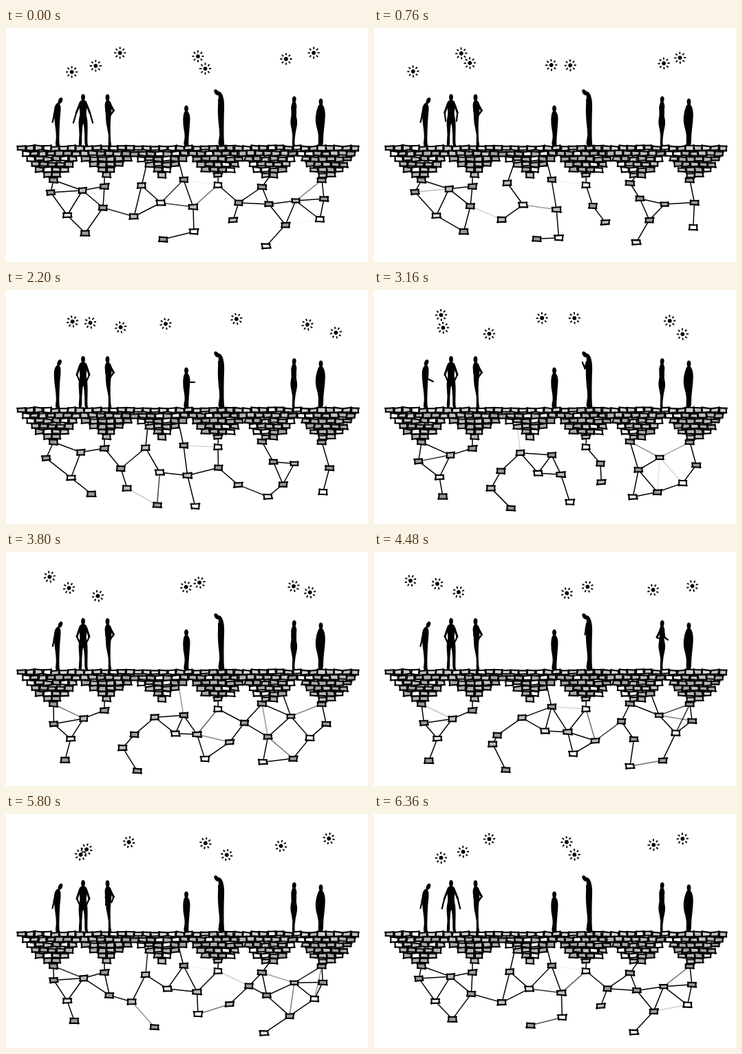
Animation, 526 px wide and 340 px high, one loop 6.4 s. Source, as an HTML page with a canvas:

```html
<!DOCTYPE html>
<html lang="en">
<head>
<meta charset="utf-8">
<title>People and roots</title>
<style>
html, body { margin: 0; width: 100%; height: 100%; overflow: hidden; background: #fff; }
canvas { display: block; }
</style>
</head>
<body>
<canvas id="stage" width="526" height="340"></canvas>
<script>
const ctx = document.getElementById('stage').getContext('2d');
const LOOP = 6400, TAU = Math.PI * 2;
const REACH = 50.8, CEILING = 220.5;
const GREY = '#999', MID = '#bcbcbc', LIGHT = '#e8e8e8', WHITE = '#fff';

let seed = 11;
const rand = () => (seed = seed * 16807 % 2147483647) / 2147483647;
const jitter = a => (rand() * 2 - 1) * a;

function line(...p) {
  ctx.beginPath();
  for (let i = 0; i < p.length; i += 2) ctx.lineTo(p[i], p[i + 1]);
  ctx.stroke();
}

// --- bricks ---
function makeBrick(w, h, fill, rough) {
  const corners = [[-1, -1], [1, -1], [1, 1], [-1, 1]]
    .map(([x, y]) => [x * w / 2 + jitter(rough), y * h / 2 + jitter(rough)]);
  return { corners, fill };
}

function drawBrick({ corners, fill }, x, y) {
  ctx.fillStyle = fill;
  ctx.lineWidth = 2.1;
  ctx.beginPath();
  corners.forEach(([a, b]) => ctx.lineTo(x + a, y + b));
  ctx.fill();
  corners.forEach(([a, b], i) => {
    const [c, d] = corners[(i + 1) % 4], over = .06;
    line(x + a - (c - a) * over, y + b - (d - b) * over,
      x + c + (c - a) * over, y + d + (d - b) * over);
  });
}

const wall = [];
function course(row, centre, count) {
  const w = 12.1;
  for (let i = 0; i < count; i++) {
    const grey = row ? 62 + rand() * 16 : 72 + rand() * 14;
    const fill = rand() < .12 ? WHITE : `hsl(0 0% ${grey}%)`;
    wall.push({
      x: centre + (i - (count - 1) / 2) * w,
      y: 174.6 + row * 7.8 + jitter(.6),
      brick: makeBrick(w - 1.2, 6.2, fill, .9)
    });
  }
}
const mound = (centre, ...counts) => counts.forEach((n, i) => course(i + 2, centre, n));
course(0, 265, 41);
course(1, 265, 40);
mound(67, 6, 5, 4, 2);
mound(146, 6, 4, 2, 1);
mound(227, 6, 4, 2, 1);
mound(308, 6, 5, 4, 1);
mound(383, 6, 5, 4, 2);
mound(466, 6, 5, 4, 2);

// --- roots: every brick circles its home on a flat ellipse, below the wall ---
const nodes = [];
function node(fill, x, y, xCos = 0, xSin = 0, yCos = 0, ySin = 0) {
  const at = a => {
    const c = Math.cos(a), s = Math.sin(a);
    return [x + xCos * c + xSin * s, Math.max(CEILING, y + yCos * c + ySin * s)];
  };
  nodes.push({ at, brick: makeBrick(11, 6.4, fill, .7) });
}
const anchor = (x, y) => nodes.push({ at: () => [x, y] });

anchor(143, 192);
anchor(207, 187);
anchor(250, 189);
anchor(309, 190);
anchor(398, 195);
node(GREY, 69, 221);
node(GREY, 143, 230);
node(WHITE, 308, 228);
node(GREY, 459, 221);
node(GREY, 65, 244, 0, -8, -5, -3);
node(MID, 111, 238, 0, -3, -2, -4);
node(LIGHT, 92, 272, -3, 1, 0, 1);
node(GREY, 107, 299, 8, 26, -1, -4);
node(GREY, 163, 262, -22, -10, -1, -4);
node(MID, 178, 281, 8, 3, -7, 4);
node(MID, 205, 233, -8, -8, -4, -7);
node(LIGHT, 232, 260, -7, -15, -6, 2);
node(GREY, 258, 214, 0, 0, -26, -3);
node(MID, 272, 264, 0, -10, -4, 4);
node(WHITE, 279, 302, -6, -9, -6, 11);
node(GREY, 213, 312, 15, 18, -5, -3);
node(GREY, 334, 253, 4, -28, 1, 7);
node(MID, 330, 279, 0, 9, 0, 5);
node(GREY, 372, 218, 0, 0, 13, -3);
node(GREY, 383, 259, -1, 6, -3, -13);
node(MID, 418, 247, 3, 3, 4, 9);
node(GREY, 465, 251, -3, 4, -3, 7);
node(WHITE, 452, 279, 4, 13, -1, 17);
node(GREY, 409, 290, -3, -10, -4, -12);
node(LIGHT, 377, 309, 1, 5, 8, -5);

function drawRoots(angle) {
  const spots = nodes.map(n => n.at(angle));
  ctx.lineWidth = 1.5;
  spots.forEach(([x, y], i) => spots.slice(0, i).forEach(([u, v]) => {
    const alpha = (REACH - Math.hypot(x - u, y - v)) / 4.5;
    if (alpha <= 0) return;
    ctx.globalAlpha = Math.min(1, alpha);
    line(x, y, u, v);
  }));
  ctx.globalAlpha = 1;
  wall.forEach(b => drawBrick(b.brick, b.x, b.y));
  nodes.forEach((n, i) => n.brick && drawBrick(n.brick, ...spots[i]));
}

// --- suns: each drifts along a Lissajous curve ---
const suns = [];
const sun = (cx, ax, fx, px, ay, fy, py) => suns.push({ cx, ax, fx, px, ay, fy, py });
sun(80, 29, 2, 1, 14.5, 1, -.3);
sun(115, 24.6, 1, -.9, 5, 2, -.1);
sun(150, 29, 2, 1, -14.5, 1, -.3);
sun(262, 30, 1, .97, 10, 2, -2.67);
sun(308, 28.3, 2, 2.28, 9.7, 1, .37);
sun(418, 20, 1, -2.16, 5.3, 2, -2.8);
sun(460.5, 20, 2, 2.3, 14.8, 1, -2.79);

function drawSun(s, angle) {
  ctx.save();
  ctx.translate(s.cx + s.ax * Math.cos(s.fx * angle + s.px), 50 + s.ay * Math.cos(s.fy * angle + s.py));
  ctx.rotate(angle);
  ctx.beginPath();
  ctx.arc(0, 0, 2.9, 0, TAU);
  ctx.fill();
  ctx.lineWidth = 1.9;
  ctx.lineCap = 'butt';
  for (let i = 0; i < 8; i++) {
    line(5.4, 0, 8.6, 0);
    ctx.rotate(TAU / 8);
  }
  ctx.restore();
}

// --- people: a resting pose, blended into a gesture around a given time ---
function bump(t, at, half) {
  const d = Math.abs((t - at + LOOP * 1.5) % LOOP - LOOP / 2);
  return d < half ? (1 + Math.cos(Math.PI * d / half)) / 2 : 0;
}
const gesture = (at, to, half = 800) => ({ at, to, half });
const pose = (rest, ...moves) => t => rest.map((v, i) =>
  moves.reduce((sum, m) => sum + (m.to[i] - v) * bump(t, m.at, m.half), v));

const people = [];
const person = (head, tilt, body, ...arms) => people.push({ head, tilt, body, arms });
// Arm poses list the elbow, then the hand.
const arm = (x, y, ...poses) => ({ x, y, bend: pose(...poses) });
const mirror = (axis, p) => p.map((v, i) => i % 2 ? v : 2 * axis - v);

person(pose([79, 105.5], gesture(2800, [75, 105.5], 1000)), .4,
  [74, 108, 78, 109, 80, 116, 78, 135, 77, 168, 79, 172, 71, 172, 73.5, 158, 70, 132, 69.5, 116],
  arm(73, 115, [70, 126, 67.5, 137],
    gesture(2200, [72, 126, 72, 138], 700), gesture(3160, [76, 128, 86, 133], 700)));

const hips = [103, 123, 108, 134], lowered = [102, 123, 95, 139], raised = [103, 125, 94, 121];
person(pose([112, 100.7]), 0,
  [110, 104, 114, 104, 119, 109, 116, 124, 119, 136, 118, 168, 120, 172, 114, 172, 114.5, 155,
    112.3, 134, 110, 155, 110.5, 172, 105, 172, 107, 155, 105, 136, 108, 124, 105, 109],
  arm(107, 111, hips, gesture(250, lowered), gesture(1520, raised)),
  arm(117, 111, mirror(112, hips), gesture(250, mirror(112, lowered)), gesture(1520, mirror(112, raised))));

person(pose([147.5, 101]), 0,
  [146, 104, 149, 104, 154, 110, 153, 124, 151.5, 138, 152, 166, 154, 172, 148, 172,
    149.5, 155, 145, 138, 145, 124, 143, 111],
  arm(152, 112, [156.5, 120, 151.5, 127], gesture(5240, [156, 123, 160.5, 134])),
  arm(145.5, 112, [146, 122, 147, 132], gesture(5240, [142, 123, 138, 133])));

person(pose([262, 117.3]), 0,
  [260, 120, 264, 120, 268, 128, 266.5, 146, 265, 167, 266, 172, 257, 171, 260.5, 158, 257, 140, 257.5, 126],
  arm(263, 125, [264, 134, 264, 142], gesture(2200, [266, 134, 274, 134])));

person(pose([306, 93.5]), -.6,
  [307, 91, 314, 94, 317.5, 108, 316.5, 130, 316.5, 167, 318.5, 172, 307, 172,
    311, 155, 308.5, 138, 307.5, 116, 309.5, 101],
  arm(309.5, 104, [310, 115, 310, 126],
    gesture(3160, [306.5, 114, 302.8, 105]), gesture(4480, [308, 112, 306.5, 120])));

person(pose([418.7, 104]), .08,
  [417, 106, 420, 106, 423, 113, 420.5, 124, 424, 137, 420.5, 152, 419, 168, 421, 172, 415, 172,
    417, 155, 412.5, 137, 415.5, 124, 414, 113],
  arm(416, 114, [416, 124, 416, 133], gesture(4480, [411, 124, 420, 128])),
  arm(420.5, 114, [420.5, 124, 420.5, 133], gesture(4480, [422, 124, 427, 127.5])));

person(pose([457.5, 107.3]), 0,
  [455, 110, 460, 110, 464, 120, 463.5, 136, 461, 155, 461, 172, 453, 172, 454.5, 155, 449, 136, 451, 120]);

function blob(p) {
  const n = p.length;
  const mid = i => [(p[i % n] + p[(i + 2) % n]) / 2, (p[(i + 1) % n] + p[(i + 3) % n]) / 2];
  ctx.beginPath();
  ctx.moveTo(...mid(0));
  for (let i = 2; i <= n; i += 2) ctx.quadraticCurveTo(p[i % n], p[(i + 1) % n], ...mid(i));
  ctx.fill();
}

function drawPerson({ head, tilt, body, arms }, t) {
  blob(body);
  ctx.beginPath();
  ctx.ellipse(...head(t), 2.9, 4.7, tilt, 0, TAU);
  ctx.fill();
  arms.forEach(({ x, y, bend }) => {
    const [ex, ey, hx, hy] = bend(t);
    ctx.lineWidth = 3;
    line(x, y, ex, ey);
    ctx.lineWidth = 2.2;
    line(ex, ey, hx, hy);
  });
}

function frame(now) {
  const t = now % LOOP, angle = t / LOOP * TAU;
  ctx.clearRect(0, 0, 526, 340);
  ctx.lineCap = ctx.lineJoin = 'round';
  ctx.fillStyle = ctx.strokeStyle = '#000';
  suns.forEach(s => drawSun(s, angle));
  people.forEach(p => drawPerson(p, t));
  drawRoots(angle);
  requestAnimationFrame(frame);
}
requestAnimationFrame(frame);
</script>
</body>
</html>
```
